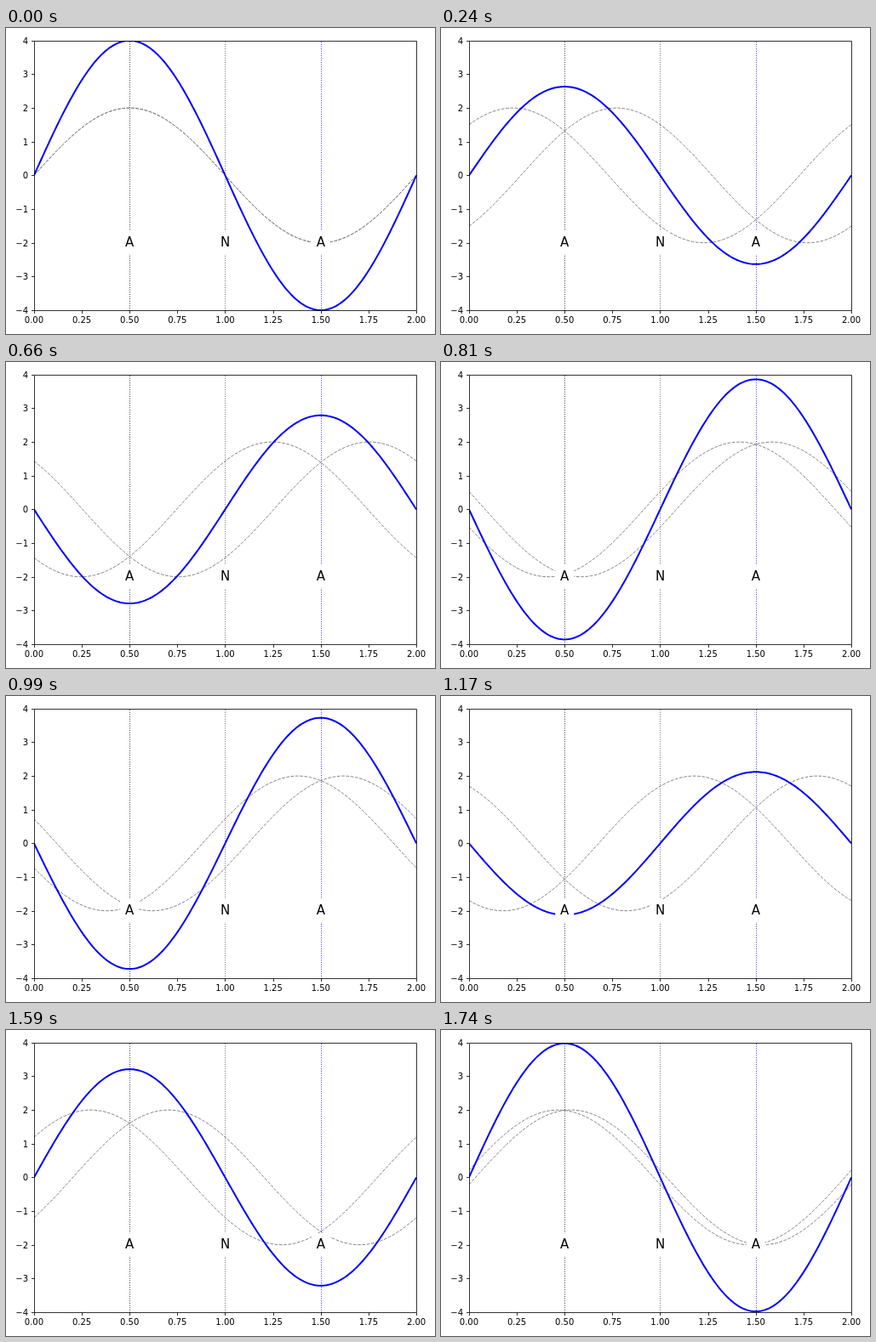
Recreate the animation shown at these times as an HTML page. Size 504x360 px, loop 1770 ms.

```html
<!DOCTYPE html>
<html lang="en">
<head>
<meta charset="utf-8">
<title>Standing wave</title>
<style>
  html, body { margin: 0; width: 100%; height: 100%; overflow: hidden; background: #fff; }
  svg { display: block; font-family: "DejaVu Sans", sans-serif; }
  path { fill: none; }
  .axis { stroke: #000; stroke-width: .8; }
  .tick { font-size: 10px; }
  .mark { font-size: 15px; text-anchor: middle; }
  .guide { stroke-width: .8; stroke-dasharray: 1 1.65; }
  .part { stroke: #808080; stroke-width: 1; stroke-dasharray: 3.7 1.6; }
  .sum { stroke: #00f; stroke-width: 2; stroke-linejoin: round; }
</style>
</head>
<body>
<svg width="504" height="360" viewBox="0 0 504 360">
  <clipPath id="plot"><rect x="33" y="15" width="449.5" height="317.5"/></clipPath>
  <g clip-path="url(#plot)">
    <g id="guides"></g>
    <path class="part" id="right"/>
    <path class="part" id="left"/>
    <path class="sum" id="sum"/>
  </g>
  <g id="axes"></g>
  <g id="marks"></g>
</svg>
<script>
const LEFT = 32.9, RIGHT = 482.1, TOP = 14.8, BOTTOM = 332;
const STEP = 30, STEPS = 59, SAMPLES = 200;

const px = x => LEFT + (RIGHT - LEFT) * x / 2;
const py = y => (TOP + BOTTOM) / 2 - (BOTTOM - TOP) * y / 8;
const snap = v => Math.floor(v + .49) + .5;
const byId = id => document.getElementById(id);

function add(parent, tag, attrs, text = '') {
  const el = document.createElementNS('http://www.w3.org/2000/svg', tag);
  for (const key in attrs) el.setAttribute(key, attrs[key]);
  el.textContent = text;
  byId(parent).append(el);
}

// Frame and ticks
const [l, r, t, b] = [LEFT, RIGHT, TOP, BOTTOM].map(snap);
add('axes', 'path', { class: 'axis', d: `M${l} ${t}H${r}V${b}H${l}Z` });

for (let i = 0; i <= 8; i++) {
  const x = px(i / 4), y = py(i - 4);
  add('axes', 'path', { class: 'axis', d: `M${snap(x)} ${b}v3.5M${l} ${snap(y)}h-3.5` });
  add('axes', 'text', { class: 'tick', x, y: 347, 'text-anchor': 'middle' }, (i / 4).toFixed(2));
  add('axes', 'text', { class: 'tick', x: 26, y: Math.round(y) + 4, 'text-anchor': 'end' },
    String(i - 4).replace('-', '\u2212'));
}

// Node and antinode markers
for (const [x, name, color] of [[.5, 'A', '#000'], [1, 'N', '#444'], [1.5, 'A', '#00f']]) {
  add('guides', 'path', { class: 'guide', stroke: color, d: `M${snap(px(x))} ${b}V${t}` });
  add('marks', 'rect', { x: px(x) - 11, y: 239, width: 22, height: 27, fill: '#fff' });
  add('marks', 'text', { class: 'mark', x: px(x), y: 257 }, name);
}

function plot(id, fn) {
  const points = [];
  for (let i = 0; i <= SAMPLES; i++) {
    const x = 2 * i / SAMPLES;
    points.push(px(x).toFixed(2) + ' ' + py(fn(x)).toFixed(2));
  }
  byId(id).setAttribute('d', 'M' + points.join('L'));
}

let shown = -1;
function draw() {
  const step = Math.floor(performance.now() / STEP + .01) % STEPS;
  if (step !== shown) {
    shown = step;
    const phase = 2 * Math.PI * step / STEPS;
    const right = x => 2 * Math.sin(Math.PI * x - phase);
    const left = x => 2 * Math.sin(Math.PI * x + phase);
    plot('right', right);
    plot('left', left);
    plot('sum', x => right(x) + left(x));
  }
  requestAnimationFrame(draw);
}
draw();
</script>
</body>
</html>
```
